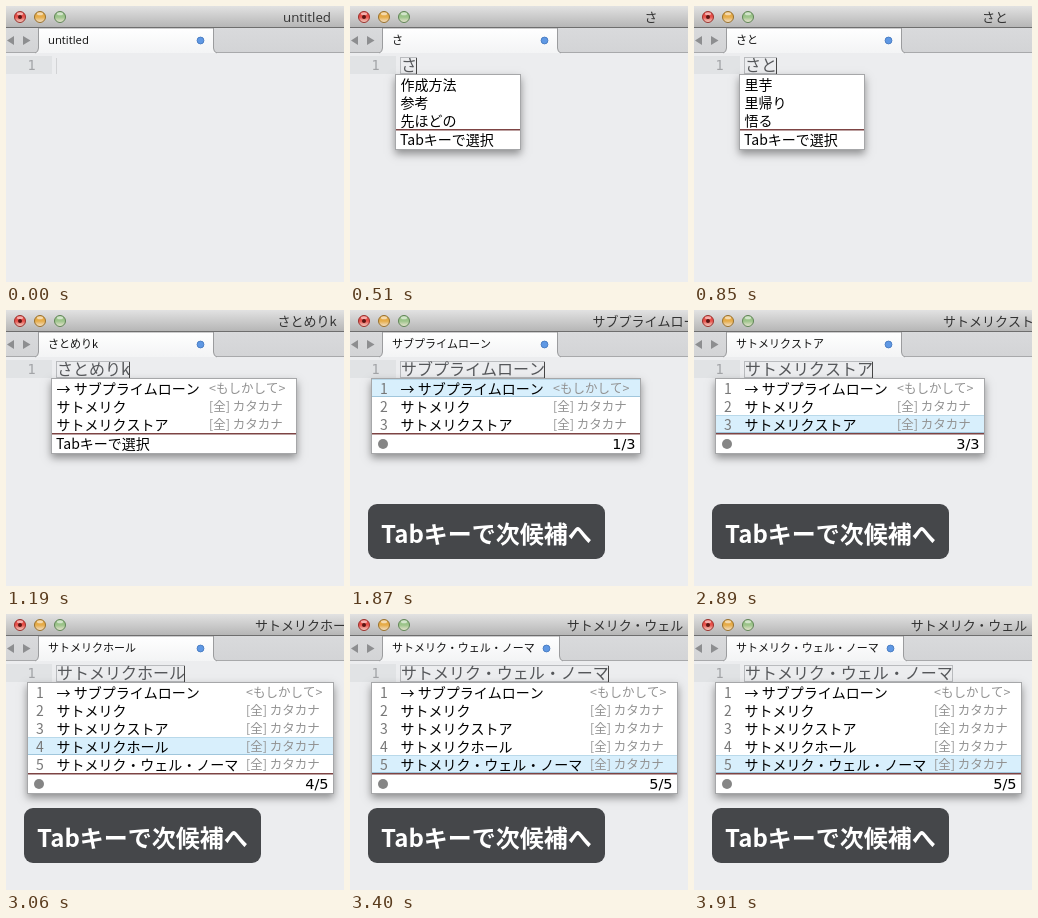
These frames come from a looping animation (338x276 px, 4.08 s). An HTML page with a canvas:

```html
<!DOCTYPE html>
<html lang="ja">
<head>
<meta charset="utf-8">
<title>Input suggestions</title>
<style>
html, body { margin: 0; width: 100%; height: 100%; overflow: hidden; background: #ecedef; }
canvas { display: block; }
</style>
</head>
<body>
<canvas id="stage" width="338" height="276"></canvas>
<script>
const ctx = document.getElementById('stage').getContext('2d');
const LOOP = 4080;
const CJK = '"Noto Sans CJK JP", "Noto Sans CJK", sans-serif';
const LATIN = '"Open Sans", sans-serif';
const WORD = '500 14px ' + CJK;

const GUESS = 'サブプライムローン';
const BRAND = 'サトメリク';
const STORE = BRAND + 'ストア';
const HALL = BRAND + 'ホール';
const LONG = BRAND + '・ウェル・ノーマ';
const KANA = '[全] カタカナ';
const three = [['→ ' + GUESS, '<もしかして>'], [BRAND, KANA], [STORE, KANA]];
const five = [...three, [HALL, KANA], [LONG, KANA]];
const plain = (...words) => words.map(w => [w, '']);

// A popup with `pick` is the numbered list; without it, the plain suggestions.
const hints = { rows: three, right: 291 };
const list = (rows, pick) => ({ rows, pick, right: rows === five ? 328 : 291 });

// [start, text, caret opacity, popup, window title if it lags behind]
const states = [
  [0, '', .15],
  [170, '', .8],
  [510, 'さ', 1, { rows: plain('作成方法', '参考', '先ほどの'), right: 171 }],
  [680, 'さt', 1, { rows: plain('さて', '里芋', '里帰り'), right: 165 }],
  [850, 'さと', 1, { rows: plain('里芋', '里帰り', '悟る'), right: 171 }],
  [1020, 'さとめり', 1, hints],
  [1190, 'さとめりk', 1, hints],
  [1360, 'さとめりく', 1, hints],
  [1700, 'さとめりく', 0, hints],
  [1870, GUESS, 1, list(three, 1)],
  [2040, GUESS, 0, list(three, 1)],
  [2210, BRAND, 1, list(three, 2)],
  [2550, STORE, 1, list(three, 3), BRAND],
  [2720, STORE, 1, list(three, 3)],
  [3060, HALL, 1, list(five, 4)],
  [3230, HALL, 0, list(five, 4)],
  [3400, LONG, 1, list(five, 5)],
  [3910, LONG, 0, list(five, 5)]
];

function rect(x, y, w, h, fill) {
  ctx.fillStyle = fill;
  ctx.fillRect(x, y, w, h);
}

function shade(y, h, ...colors) {
  const g = ctx.createLinearGradient(0, y, 0, y + h);
  colors.forEach((c, i) => g.addColorStop(i / (colors.length - 1), c));
  return g;
}

function text(s, x, y, font, color, align = 'left') {
  ctx.font = font;
  ctx.fillStyle = color;
  ctx.textAlign = align;
  ctx.fillText(s, x, y);
}

function disc(x, y, r, fill, edge) {
  ctx.beginPath();
  ctx.arc(x, y, r, 0, 7);
  ctx.fillStyle = fill;
  ctx.fill();
  if (edge) {
    ctx.strokeStyle = edge;
    ctx.lineWidth = 1;
    ctx.stroke();
  }
}

function triangle(x, tip) {
  ctx.beginPath();
  ctx.moveTo(x, 30);
  ctx.lineTo(x, 39);
  ctx.lineTo(tip, 34.5);
  ctx.fillStyle = '#8d8e90';
  ctx.fill();
}

function drawTitleBar(title, font) {
  rect(0, 0, 338, 21, shade(0, 21, '#e2e2e2', '#b6b6b6'));
  [['#e8504a', '#9a302c'], ['#e6ac49', '#98702c'], ['#9cc48a', '#5f8456']].forEach(([c, edge], i) => {
    const x = 14 + 20 * i;
    disc(x, 11, 5.5, shade(5, 12, c, c, '#f4e9dc'), edge);
    ctx.beginPath();
    ctx.ellipse(x, 7.8, 3, 1.5, 0, 0, 7);
    ctx.fillStyle = 'rgba(255,255,255,.55)';
    ctx.fill();
  });
  disc(14, 11, 2, '#5a1512');
  text(title, 301, 16, font, '#333', 'center');
}

function drawTab(label, font) {
  ctx.font = font;
  // The tab grows only when its label is long.
  const right = Math.max(207.5, Math.round(ctx.measureText(label).width) + 66.5);
  rect(0, 22, 338, 24, shade(22, 24, '#d9dadc', '#d3d4d6'));
  rect(0, 46, 338, 1, '#a8a9ab');
  ctx.beginPath();
  ctx.moveTo(29, 47);
  ctx.quadraticCurveTo(32.5, 46, 32.5, 42);
  ctx.lineTo(32.5, 22);
  ctx.lineTo(right, 22);
  ctx.lineTo(right, 42);
  ctx.quadraticCurveTo(right, 46, right + 3.5, 47);
  ctx.fillStyle = shade(22, 25, '#fff', '#f3f4f5');
  ctx.fill();
  ctx.strokeStyle = '#9b9c9e';
  ctx.lineWidth = 1;
  ctx.stroke();
  rect(0, 21, 338, 1, '#6e6e6e');
  triangle(8, 1);
  triangle(17, 24.5);
  disc(right - 13, 34.5, 3.4, '#5f98e4', '#4c7fc4');
  text(label, 42, 38, font, '#111');
}

function drawWindow(title) {
  const untitled = title === 'untitled';
  rect(0, 0, 338, 276, '#ecedef');
  drawTitleBar(title, untitled ? '13.3px ' + LATIN : '13px ' + CJK);
  drawTab(title, untitled ? '11.3px ' + LATIN : '500 11px ' + CJK);
  rect(0, 50, 46, 18, '#e1e3e5');
  text('1', 21.5, 64, '13.5px "DejaVu Sans Mono", monospace', '#a2a4a7');
}

function drawInput(s, caret) {
  ctx.font = '16px ' + CJK;
  const w = Math.round(ctx.measureText(s).width);
  if (s) {
    ctx.strokeStyle = '#b9bbbe';
    ctx.lineWidth = 1;
    ctx.strokeRect(50.5, 51.5, w, 16);
    text(s, 51, 65, ctx.font, '#55575a');
  }
  rect(50 + w, 52, 1, 16, `rgba(70,70,70,${caret})`);
}

function drawPopup({ rows, pick, right }) {
  const left = pick ? 21 : 45;
  const w = right - left;
  const line = 69 + 18 * rows.length;
  const h = line + 21 - 68;
  ctx.save();
  ctx.shadowColor = 'rgba(0,0,0,.4)';
  ctx.shadowBlur = 8;
  ctx.shadowOffsetY = 4;
  rect(left, 68, w, h, '#fff');
  ctx.restore();
  ctx.strokeStyle = '#a6a7a9';
  ctx.lineWidth = 1;
  ctx.strokeRect(left + .5, 68.5, w - 1, h - 1);

  rows.forEach(([word, note], i) => {
    const y = 69 + 18 * i;
    if (pick === i + 1) {
      rect(left + 1, y, w - 2, 18, '#d8effc');
      rect(left + 1, y, w - 2, 1, '#b9d9ea');
      rect(left + 1, y + 17, w - 2, 1, '#a0c6dc');
    }
    if (pick) text(i + 1, 30, y + 15, '14px ' + CJK, '#777');
    text(word, 50.5, y + 15, WORD, '#000');
    text(note, right - 88, y + 14, '12.5px ' + CJK, '#929292');
  });
  rect(left + 1, line, w - 2, 1.5, '#7d4444');
  if (pick) {
    disc(33, line + 11, 5, '#858585');
    text(pick + '/' + rows.length, right - 5.5, line + 16, '14.5px "DejaVu Sans", sans-serif', '#000', 'right');
  } else {
    text('Tabキーで選択', 50, line + 16, WORD, '#000');
  }
}

function drawLabel() {
  ctx.beginPath();
  ctx.roundRect(18, 194, 237, 55, 9);
  ctx.fillStyle = '#45474a';
  ctx.fill();
  text('Tabキーで次候補へ', 31, 233, 'bold 24px ' + CJK, '#fff');
}

function draw(now) {
  const t = now % LOOP;
  const [, input, caret, popup, title] = states.findLast(s => s[0] <= t);
  drawWindow(title || input || 'untitled');
  drawInput(input, caret);
  if (popup) drawPopup(popup);
  if (t >= 1870) drawLabel();
}

function tick() {
  draw(performance.now());
  requestAnimationFrame(tick);
}
tick();
</script>
</body>
</html>
```
